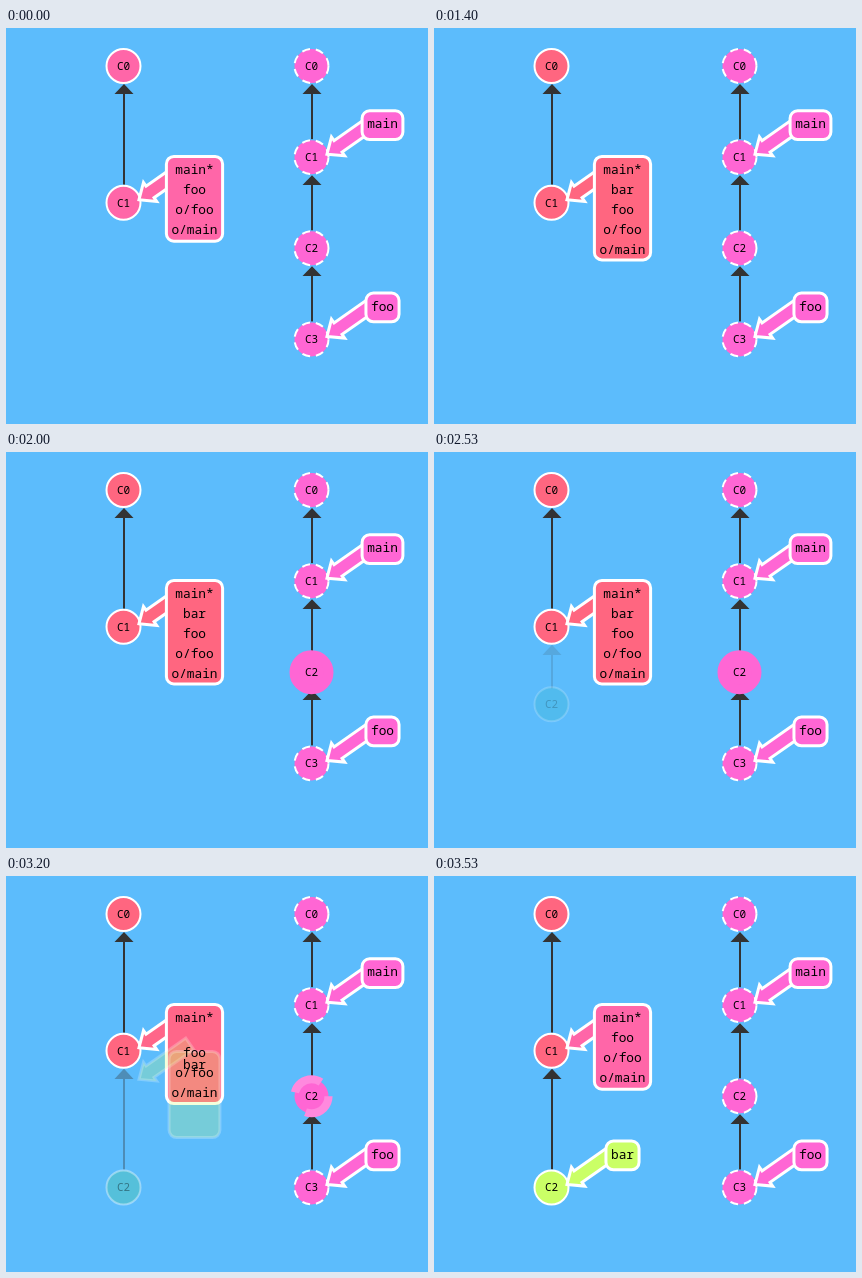
Animation of 422x396 px, one loop 5740 ms. Source, as an HTML page with a canvas:

```html
<!DOCTYPE html>
<html>
<head>
<meta charset="utf-8">
<style>
  html, body { margin: 0; width: 100%; height: 100%; overflow: hidden; background: #5cbcfc; }
  canvas { display: block; width: 422px; height: 396px; }
</style>
</head>
<body>
<canvas id="stage"></canvas>
<script>
const WIDTH = 422, HEIGHT = 396, LOOP = 5740;
const LEFT = 117.5, RIGHT = 305.5, RADIUS = 17;
const TOP = 38, BOTTOM = 311.4;
const PINK = [255, 102, 168], BLEND = [255, 102, 128], REMOTE = [255, 102, 212];
const LIME = [202, 255, 102], TEAL = [36, 179, 179], WHITE = [255, 255, 255];
const MONO = '"Noto Sans Mono", monospace';
const CHAR_WIDTH = 7.7, LINE_STEP = 20;
const LABEL_DX = 71, LABEL_DY = -32.8;

const canvas = document.getElementById('stage');
const ctx = canvas.getContext('2d');
const ratio = window.devicePixelRatio || 1;
canvas.width = WIDTH * ratio;
canvas.height = HEIGHT * ratio;

const lerp = (a, b, p) => a + (b - a) * p;
const mix = (a, b, p) => a.map((v, i) => lerp(v, b[i], p));
const rgb = c => `rgb(${c.map(Math.round).join(',')})`;
const progress = (t, start, length) => Math.min(1, Math.max(0, (t - start) / length));

function easeInOut(n) {
  if (n <= 0 || n >= 1) return n;
  const q = 0.48 - n / 1.04, root = Math.sqrt(0.1734 + q * q);
  const s = Math.cbrt(root - q) + Math.cbrt(-root - q) + 0.5;
  return s * s * (3 - 2 * s);
}

function bounce(n) {
  const arc = (centre, floor) => 7.5625 * (n - centre / 2.75) ** 2 + floor;
  if (n < 1 / 2.75) return arc(0, 0);
  if (n < 2 / 2.75) return arc(1.5, 0.75);
  if (n < 2.5 / 2.75) return arc(2.25, 0.9375);
  return arc(2.625, 0.984375);
}

function text(str, x, y, font) {
  ctx.font = font;
  ctx.textAlign = 'center';
  ctx.fillStyle = '#000';
  ctx.fillText(str, x, Math.round(y + 4));
}

function withAlpha(alpha, draw) {
  ctx.save();
  ctx.globalAlpha = alpha;
  draw();
  ctx.restore();
}

function node(name, x, y, fill, { stroke = WHITE, width = 2, dashed = false } = {}) {
  ctx.beginPath();
  ctx.arc(x, y, RADIUS, 0, 2 * Math.PI);
  ctx.fillStyle = rgb(fill);
  ctx.fill();
  ctx.setLineDash(dashed ? [4 * width, 3 * width] : []);
  ctx.lineWidth = width;
  ctx.strokeStyle = rgb(stroke);
  ctx.stroke();
  ctx.setLineDash([]);
  text(name, x, y, `500 11px ${MONO}`);
}

// Arrow from a child commit up to its parent, aligned to whole pixels.
function edge(nodeX, parentY, childY) {
  const x = nodeX + 0.5, tip = parentY + 18, base = Math.round(tip + 10);
  ctx.fillStyle = '#333';
  ctx.beginPath();
  ctx.moveTo(x, tip);
  ctx.lineTo(x + 9.5, base);
  ctx.lineTo(x - 9.5, base);
  ctx.fill();
  ctx.fillRect(x - 1, base, 2, Math.max(0, childY - 18 - base));
}

function paintTag(fill) {
  ctx.fillStyle = rgb(fill);
  ctx.fill();
  ctx.lineWidth = 3;
  ctx.strokeStyle = '#fff';
  ctx.stroke();
}

function pointer(x, y, fill) {
  ctx.save();
  ctx.translate(x + 15.5, y - 3);
  ctx.rotate(-35 * Math.PI / 180);
  ctx.beginPath();
  ctx.moveTo(0, 0);
  for (const [u, v] of [[13.5, 11.5], [13.5, 7], [62, 7], [62, -7], [13.5, -7], [13.5, -11.5]]) ctx.lineTo(u, v);
  ctx.closePath();
  paintTag(fill);
  ctx.restore();
}

// Rounded box whose first text line is centred on y.
function box(x, y, chars, lines, fill) {
  const w = chars * CHAR_WIDTH + 10, h = lines * 18.7 + 10;
  ctx.beginPath();
  ctx.roundRect(x - w / 2, y - 13.5, w, h, 7.5);
  paintTag(fill);
}

const label = (str, x, y) => text(str, x, y, `12.8px ${MONO}`);

function remoteTag(name, y) {
  pointer(RIGHT, y, REMOTE);
  box(RIGHT + LABEL_DX, y + LABEL_DY, name.length, 1, REMOTE);
  label(name, RIGHT + LABEL_DX, y + LABEL_DY);
}

function drawRemote(highlight, restore) {
  const ys = [0, 1, 2, 3].map(i => lerp(TOP, BOTTOM, i / 3));
  for (let i = 1; i < 4; i++) edge(RIGHT, ys[i - 1], ys[i]);
  const glow = highlight - restore;
  ys.forEach((y, i) => {
    const style = i === 2
      ? { stroke: mix(WHITE, REMOTE, glow), width: lerp(2, 10, glow), dashed: highlight === 0 || restore > 0 }
      : { dashed: true };
    node('C' + i, RIGHT, y, REMOTE, style);
  });
  remoteTag('main', ys[1]);
  remoteTag('foo', ys[3]);
}

function drawLocal(t, join, leave) {
  const y0 = TOP, y1 = (TOP + BOTTOM) / 2, y2 = BOTTOM;
  const birth = 2311;

  if (t > birth + 50) {
    const nodeY = lerp(y1, y2, bounce(progress(t, birth, 800)));
    const edgeY = lerp(y1, y2, easeInOut(progress(t, birth, 400)));
    withAlpha(lerp(0.15, 1, leave), () => edge(LEFT, y1, edgeY));
    withAlpha(lerp(0.2, 1, leave), () => node('C2', LEFT, nodeY, mix(TEAL, LIME, leave)));
  }
  edge(LEFT, y0, y1);
  const nodeFill = mix(PINK, BLEND, join);
  node('C0', LEFT, y0, nodeFill);
  node('C1', LEFT, y1, nodeFill);

  const x = LEFT + LABEL_DX, top = y1 + LABEL_DY;
  const extra = join - leave;
  const tagFill = mix(PINK, BLEND, extra);
  pointer(LEFT, y1, tagFill);
  box(x, top, 6, 4 + extra, tagFill);

  const barY = leave > 0
    ? lerp(top + LINE_STEP, y2 + LABEL_DY, leave)
    : lerp(top - LINE_STEP, top + LINE_STEP, join);
  if (leave > 0) withAlpha(leave, () => {
    pointer(LEFT, lerp(y1, y2, leave), LIME);
    box(x, barY, lerp(6, 3, leave), lerp(5, 1, leave), LIME);
  });

  label('main*', x, top);
  ['foo', 'o/foo', 'o/main'].forEach((name, i) => label(name, x, top + LINE_STEP * (i + 1 + extra)));
  if (join > 0) label('bar', x, barY);
}

function frame(now) {
  const t = now % LOOP;
  const join = easeInOut(progress(t, 1010, 400));
  const highlight = easeInOut(progress(t, 1445, 528));
  const leave = easeInOut(progress(t, 3062, 415));

  ctx.setTransform(ratio, 0, 0, ratio, 0, 0);
  ctx.fillStyle = '#5cbcfc';
  ctx.fillRect(0, 0, WIDTH, HEIGHT);
  drawLocal(t, join, leave);
  drawRemote(highlight, leave);
  requestAnimationFrame(loop);
}

let start;
function loop(now) {
  start ??= now;
  frame(now - start);
}
requestAnimationFrame(loop);
</script>
</body>
</html>
```
